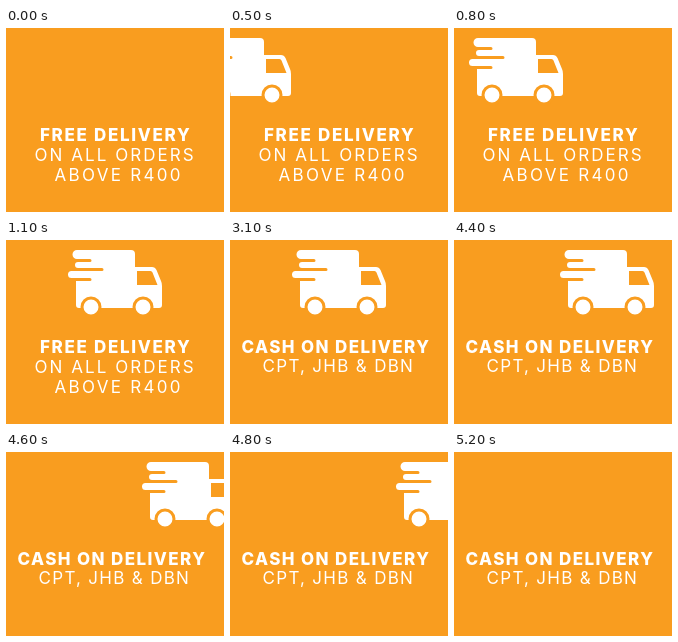
These frames come from a looping animation (218 by 184 pixels, 5.7 s). An HTML page:

```html
<!DOCTYPE html>
<html lang="en">
<head>
<meta charset="utf-8">
<title>Delivery banner</title>
<style>
  html, body { margin: 0; height: 100%; overflow: hidden; background: #f99d1f; }
  svg { display: block; width: 218px; height: 184px; }
  text { font: 400 17px Inter, Lato, sans-serif; fill: #fff; }
  .bold { font-weight: 800; }
</style>
</head>
<body>
<svg viewBox="0 0 218 184">
  <g id="truck" fill="#fff">
    <!-- cargo box with speed streaks -->
    <path d="M71 10H125Q129 10 129 14V68H73Q70 68 70 65V41H84A1.500 1.500 0 0 0 84 38H65.500A3.500 3.500 0 0 1 65.500 31H96A1.500 1.500 0 0 0 96 28H72A3 3 0 0 1 72 22H84A1.500 1.500 0 0 0 84 19H71A4.500 4.500 0 0 1 71 10Z"/>
    <!-- cab -->
    <path fill-rule="evenodd" d="M128 27H146Q149 27 150.500 30L155 41Q156 43 156 46V65Q156 68 153 68H128ZM131 31V45H151.500L146.500 32.500Q146 31 144.500 31Z"/>
    <g stroke="#f99d1f" stroke-width="3">
      <circle cx="85" cy="67" r="9"/>
      <circle cx="137" cy="67" r="9"/>
    </g>
  </g>
  <g id="free">
    <text class="bold" x="34" y="113" letter-spacing="1.660">FREE DELIVERY</text>
    <text x="28.500" y="133" letter-spacing="2.050">ON ALL ORDERS</text>
    <text x="48.500" y="153" letter-spacing="2.300">ABOVE R400</text>
  </g>
  <g id="cash">
    <text class="bold" x="11.500" y="113" letter-spacing="1.400">CASH ON DELIVERY</text>
    <text x="32.500" y="132" letter-spacing="1.300">CPT, JHB &amp; DBN</text>
  </g>
</svg>
<script>
  const LOOP = 5700, STEP = 100;
  const [truck, free, cash] = ["truck", "free", "cash"].map(id => document.getElementById(id));

  // Number of 100 ms steps taken since a start time, limited to a maximum.
  const steps = (time, start, max) =>
    Math.max(0, Math.min(max, Math.floor((time - start) / STEP) + 1));

  function truckOffset(time) {
    const entered = steps(time, 200, 10);
    const left = steps(time, 4200, 11);
    return Math.round((entered - 10) * 15.8 + left * 14.8);
  }

  function draw(now) {
    const time = now % LOOP;
    truck.setAttribute("transform", `translate(${truckOffset(time)} 0)`);
    free.style.display = time < 3100 ? "" : "none";
    cash.style.display = time < 3100 ? "none" : "";
    requestAnimationFrame(() => draw(performance.now()));
  }

  draw(performance.now());
</script>
</body>
</html>
```
